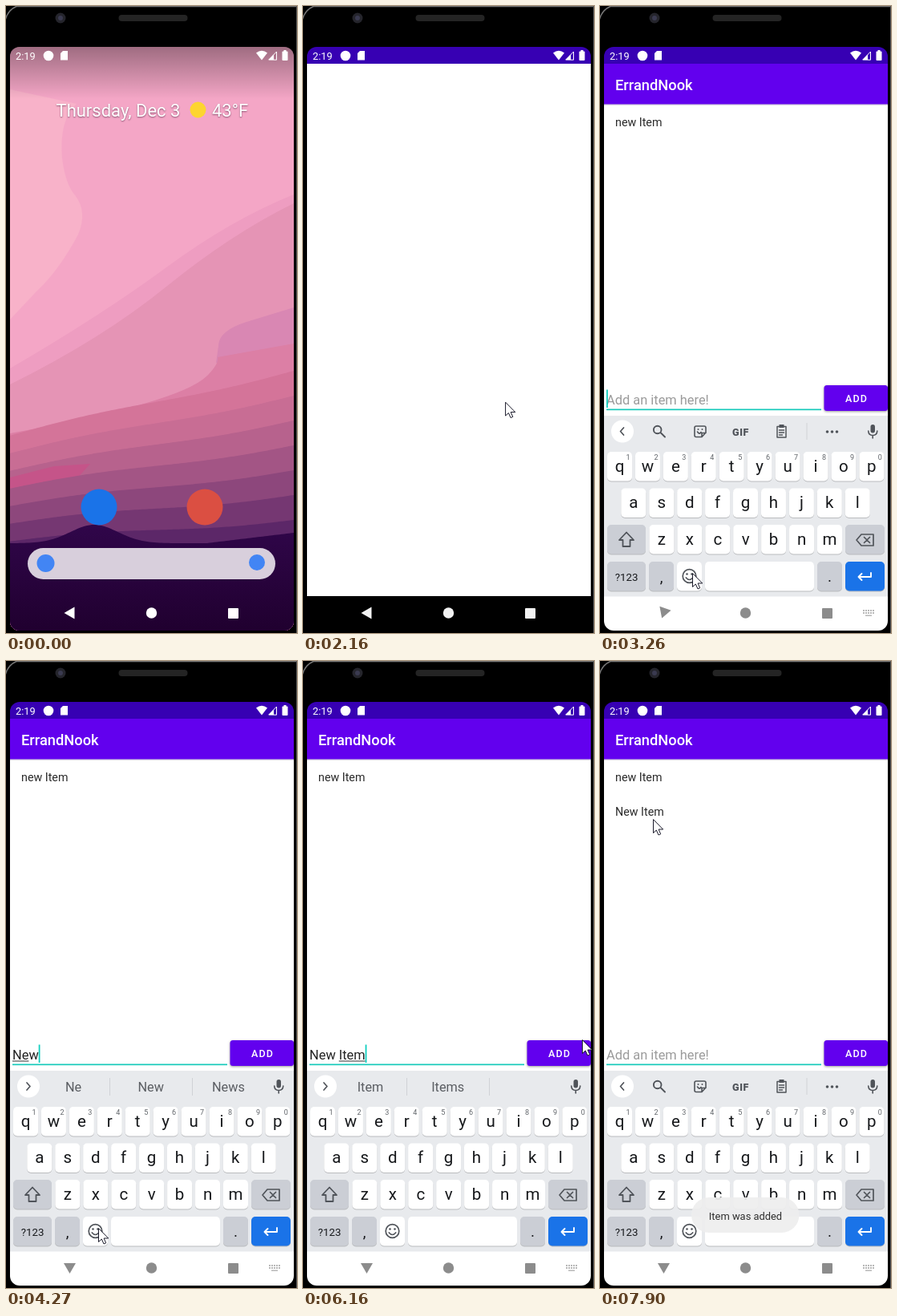
An HTML page with a canvas that plays this animation: 363x782 px, repeating every 8000 ms.

```html
<!DOCTYPE html>
<html lang="en">
<head>
<meta charset="utf-8">
<title>List app demo</title>
<style>
html, body { margin: 0; width: 100%; height: 100%; overflow: hidden; background: #000; }
canvas { display: block; width: 363px; height: 782px; }
</style>
</head>
<body>
<canvas id="stage"></canvas>
<script>
const W = 363, H = 782, LOOP = 8000;
const canvas = document.getElementById('stage');
const dpr = window.devicePixelRatio || 1;
canvas.width = W * dpr;
canvas.height = H * dpr;
const c = canvas.getContext('2d');

// Key moments, in ms
const LAUNCH = 1500, FULL = 1650, READY = 2310, FOCUS = 3020, KEYS = 3140;
const TYPE = 4000, WORD2 = 4700, TYPED = 5150, PRESS = 6820, ADDED = 7090, CLOSED = 7360;

const ramp = (t, a, b) => Math.min(1, Math.max(0, (t - a) / (b - a)));
const easeOut = u => 1 - (1 - u) ** 2;
const mix = (a, b, u) => a + (b - a) * u;

function rect(x, y, w, h, color) {
  c.fillStyle = color;
  c.fillRect(x, y, w, h);
}
function box(x, y, w, h, r, color) {
  c.fillStyle = color;
  c.beginPath();
  c.roundRect(x, y, w, h, r);
  c.fill();
}
function disc(x, y, r, color) {
  c.fillStyle = color;
  c.beginPath();
  c.arc(x, y, r, 0, 7);
  c.fill();
}
function shape(d, color) {
  c.fillStyle = color;
  c.fill(new Path2D(d));
}
function path(d, color, width) {
  c.strokeStyle = color;
  c.lineWidth = width;
  c.lineCap = c.lineJoin = 'round';
  c.stroke(new Path2D(d));
}
function text(s, x, y, size, color, align = 'left', weight = 400) {
  c.font = `${weight} ${size}px Roboto, sans-serif`;
  c.textAlign = align;
  c.fillStyle = color;
  c.fillText(s, x, y);
}
function fade(y, h, from, to) {
  const g = c.createLinearGradient(0, y, 0, y + h);
  g.addColorStop(0, from);
  g.addColorStop(1, to);
  return g;
}

function phone() {
  rect(0, 0, W, H, '#000');
  path('M-1 18Q2 5 13 .5H363', '#777', 1.5);
  rect(362, 0, 1, H, '#555');
  disc(68, 15, 6.5, '#25252c');
  disc(68, 15, 3, '#3a3a50');
  box(140.5, 11, 86, 8, 4, '#242424');
}

// Fills everything below the line y(x)
function land(color, y) {
  c.fillStyle = color;
  c.beginPath();
  for (let x = 5; x <= 359; x += 3) c.lineTo(x, y(x));
  c.lineTo(359, H);
  c.lineTo(5, H);
  c.fill();
}

function wallpaper() {
  rect(5, 51, 354, 728, '#f4a6c6');
  shape('M5 104L88 122Q66 142 70 190Q74 222 86 236Q102 256 90 285Q66 330 38 356L5 391Z', '#f8b2c9');
  shape('M5 452Q120 385 200 326T359 235V782H5Z', '#ee9dc1');
  shape('M5 472Q120 415 200 350T359 246V782H5Z', '#e594b5');
  shape('M359 376L300 394Q265 405 265 424L262 445L359 428Z', '#d987b3');
  shape('M5 533Q215 495 250 462Q266 446 264 438L359 421V782H5Z', '#dc7fa5');
  for (let i = 0; i < 7; i++) {
    const u = (i / 6) ** 1.3;
    const rgb = [mix(212, 92, u), mix(116, 39, u), mix(153, 104, u)];
    land(`rgb(${rgb})`, x => mix(536 + 22 * i, 454 + 31 * i, (x - 5) / 354) - 3 * Math.sin(x / 60));
    if (i === 2) shape('M5 588L60 574L105 571L88 590L5 607Z', '#c55489');
  }
  land(fade(647, 132, '#30064a', '#20002f'),
    x => 670 - 23 * Math.exp(-(((x - 110) / 42) ** 2)) - 13 * ramp(x, 250, 359));
  rect(5, 51, 354, 65, fade(51, 65, 'rgba(0,0,0,.35)', 'rgba(0,0,0,0)'));
}

function home() {
  c.save();
  c.shadowColor = 'rgba(60,20,50,.6)';
  c.shadowBlur = 2;
  c.shadowOffsetY = 1;
  text('Thursday, Dec 3', 62.5, 138, 22, '#fff');
  text('43°F', 257, 138, 22, '#fff');
  c.restore();
  disc(239.5, 129.5, 10, '#fdd530');
  disc(116, 625, 22.5, '#1a73e8');
  disc(248, 625, 22.5, '#db4f42');
  box(27, 676, 309, 39, 19.5, '#d8cfdc');
  disc(49.5, 695, 11, '#4285f4');
  disc(313, 694, 10, '#4285f4');
}

function statusIcons() {
  text('2:19', 12, 66.5, 12.8, '#fff');
  disc(53, 62, 6.3, '#fff');
  shape('M71 56H77V67.5H68V59Z', '#fff');
  shape('M312 58.5Q319 53 326 58.5L319 67.5Z', '#fff');
  path('M328 66.8L337.5 57V66.8Z', '#fff', 1);
  shape('M327.5 67L334 60.5V67Z', '#fff');
  box(344.5, 56.5, 7, 11.5, 1, '#fff');
  rect(346.5, 55, 3, 2, '#fff');
}

function navIcons(color, turn) {
  c.save();
  c.translate(79.5, 757);
  c.rotate(-turn);
  shape('M-7 0L6 -7.5V7.5Z', color);
  c.restore();
  disc(181.5, 757, 6.7, color);
  box(277, 751, 13, 13, 1, color);
}

function imeIcon(color) {
  for (let i = 0; i < 10; i++) rect(328 + i % 5 * 3, i < 5 ? 753 : 756, 2, 2, color);
  rect(331, 759.5, 8, 1.5, color);
}

function launchWindow() {
  rect(10, 61, 344, 21, '#3700b3');
  rect(10, 82, 344, 644, '#fff');
  rect(10, 726, 344, 42, '#000');
}

// One letter at a time, with a pause between the words
function typedText(t) {
  if (t < TYPE || t >= ADDED) return '';
  const n = t < WORD2
    ? Math.min(4, 1 + Math.floor((t - TYPE) / 133))
    : 5 + Math.floor((t - WORD2) / 80);
  return 'New Item'.slice(0, n);
}

// The keyboard reacts a little later than the field
const stem = t => typedText(t - 100).split(' ').pop();

function guesses(t) {
  if (!typedText(t)) return [];
  const word = stem(t);
  const known = ['New', 'News', 'Item', 'Items'].filter(w => w.startsWith(word));
  return [...new Set([word, ...known])].filter(Boolean).slice(0, 3);
}

function caretOn(t) {
  if (t >= TYPE && t < TYPED) return true;
  const reset = [READY, FOCUS - 90, TYPED, ADDED].findLast(r => r <= t);
  return (t - reset) % 1000 < 500;
}

function addButton(t, dy) {
  const press = Math.min(ramp(t, PRESS - 60, PRESS + 130), 1 - ramp(t, ADDED, CLOSED));
  c.save();
  c.shadowColor = 'rgba(0,0,0,.4)';
  c.shadowBlur = 3 + 3 * press;
  c.shadowOffsetY = 1 + press;
  box(279.5, 473 + dy, 79.5, 32, 3.5, '#6200ee');
  c.restore();
  box(279.5, 473 + dy, 79.5, 32, 3.5, `rgba(255,255,255,${.24 * press})`);
  c.letterSpacing = '1.1px';
  text('ADD', 306, 494 + dy, 12.5, '#fff', 'left', 500);
  c.letterSpacing = '0px';
}

function inputRow(t, dy) {
  const typed = typedText(t);
  text(typed || 'Add an item here!', 8, 496.5 + dy, 16.4, typed ? '#222' : '#9b9b9b');
  const width = s => c.measureText(s).width;
  if (typed) {
    const start = typed.slice(0, typed.lastIndexOf(' ') + 1);
    rect(8 + width(start), 498.5 + dy, width(stem(t)), 1, '#333');
  }
  rect(8, 502.5 + dy, 268, 1.7, '#16cabb');
  if (caretOn(t)) rect(8 + width(typed), 478.5 + dy, 1.8, 22.5, '#12cfc0');
  addButton(t, dy);
}

function appScreen(t, dy) {
  rect(5, 72, 354, 50.5, '#6200ee');
  rect(5, 122.5, 354, 2, fade(122.5, 2, 'rgba(60,20,120,.35)', 'rgba(60,20,120,0)'));
  text('ErrandNook', 19, 105, 18.3, '#fff', 'left', 500);
  text('new Item', 19, 150, 14.3, '#2a2a2a');
  if (t >= ADDED) text('New Item', 19, 193, 14.3, '#2a2a2a');
  inputRow(t, dy);
}

const INK = '#50545a', GREY = '#cbced5', PITCH = 34.93, KEY_W = 31, KEY_H = 36.5;

function key(x, y, w, color, label, size = 20.5, drop = 24.5) {
  box(x, y + 1, w, KEY_H, 5, 'rgba(0,0,0,.2)');
  box(x, y, w, KEY_H, 5, color);
  if (label) text(label, x + w / 2, y + drop, size, '#16181b', 'center');
}
function letters(s, x, y) {
  [...s].forEach((ch, i) => key(x + i * PITCH, y, KEY_W, '#fff', ch));
}

function mic() {
  box(337.5, 522, 5.5, 10.5, 2.7, INK);
  path('M334.7 530Q335 535.5 340.2 535.5Q345.5 535.5 345.8 530M340.2 536V539', INK, 1.6);
}

function toolbar() {
  path('M29.5 526L25.5 530.5L29.5 535', INK, 1.7);
  path('M76.5 528.5A4.8 4.8 0 1 1 66.9 528.5A4.8 4.8 0 1 1 76.5 528.5M75.5 532L81 537.5', INK, 1.9);
  path('M120 524H130Q132 524 132 526V532L127 537.5H120Q118 537.5 118 535.5V526Q118 524 120 524M127 537V532.5H132M121.5 531Q124 535 126 531.5', INK, 1.6);
  disc(122.5, 528, 1, INK);
  disc(127.5, 528, 1, INK);
  c.letterSpacing = '.6px';
  text('GIF', 175.5, 535.5, 12.5, INK, 'center', 900);
  c.letterSpacing = '0px';
  path('M221 524.5H232V538H221ZM223.5 529H229.5M223.5 532H229.5M223.5 535H227.5', INK, 1.5);
  rect(223.5, 522, 6, 4, INK);
  rect(257.5, 520, 1, 21, '#d0d2d6');
  for (let i = 0; i < 3; i++) disc(283.5 + 6 * i, 531, 1.8, INK);
}

function suggestions(words) {
  path('M26 526L30 530.5L26 535', INK, 1.7);
  words.forEach((w, i) => text(w, 84 + i * 96.7, 537, 16.3, '#5a5d62', 'center'));
  rect(129, 520, 1, 22, '#d0d2d6');
  rect(232, 520, 1, 22, '#d0d2d6');
}

function keyboard(t) {
  rect(5, 511, 354, 226, '#e8eaed');
  disc(28, 530.5, 14, '#fff');
  if (t >= TYPE + 270 && t < CLOSED) suggestions(guesses(t));
  else toolbar();
  mic();

  letters('qwertyuiop', 9, 556);
  for (let i = 0; i < 10; i++) text((i + 1) % 10, 35 + i * PITCH, 566, 9, '#5f6368', 'center');
  letters('asdfghjkl', 26.3, 601.5);
  letters('zxcvbnm', 61.4, 647);
  key(9, 647, 48, GREY);
  path('M33 656.5L42 666H37.5V674H28.5V666H24Z', INK, 1.8);
  key(306, 647, 49, GREY);
  path('M326 659H341V673H326L320 666ZM329.5 662.5L336.5 669.5M336.5 662.5L329.5 669.5', INK, 1.7);

  key(9, 693, 48, GREY, '?123', 13.3, 23.5);
  key(61, 693, KEY_W, GREY, ',', 19, 26);
  key(96, 693, KEY_W, '#fff');
  path('M103.2 711A8.3 8.3 0 1 1 119.8 711A8.3 8.3 0 1 1 103.2 711M107.3 713Q111.5 718 115.7 713', INK, 1.7);
  disc(108.5, 708.5, 1.3, INK);
  disc(114.5, 708.5, 1.3, INK);
  key(131, 693, 136, '#fff');
  key(271, 693, KEY_W, GREY, '.', 19, 25);
  key(306, 693, 49, '#1a73e8');
  path('M338 707V712H322.5M326.5 708L322.5 712L326.5 716', '#fff', 1.9);
}

function toast(alpha) {
  c.save();
  c.globalAlpha = alpha;
  box(114, 669, 134.5, 44, 22, 'rgba(238,238,238,.92)');
  text('Item was added', 181.5, 697, 12.9, '#2f2f2f', 'center');
  c.restore();
}

function pointer(t) {
  if (t < 2040) return;
  const pace = 136.4;
  const now = LAUNCH + Math.floor((t + 60 - LAUNCH) / pace) * pace;
  let x = 334, y = 367;
  const glide = (start, end, toX, toY) => {
    const u = easeOut(ramp(now, start, end));
    x = mix(x, toX, u);
    y = mix(y, toY, u);
  };
  glide(2040, 2720, 115, 708);
  glide(5820, 6130, 348, 473);
  glide(6170, 6400, 320, 474);
  glide(7220, 7860, 66, 198);

  const arrow = 'M0 0V16.5L3.8 13L6.5 19L9.2 17.8L6.6 12H11.8Z';
  c.save();
  c.translate(x + .5, y);
  shape(arrow, '#fff');
  path(arrow, '#1a1a2a', 1);
  c.restore();
}

function draw(t) {
  phone();
  c.save();
  c.beginPath();
  c.roundRect(5, 51, 354, 728, 12);
  c.clip();

  const keys = t >= KEYS;
  if (t < FULL) {
    wallpaper();
    if (t < LAUNCH) home();
    else launchWindow();
  } else {
    rect(5, 51, 354, 728, '#000');
    rect(5, 51, 354, 21, '#3700b3');
    rect(5, 72, 354, 664, '#fff');
    if (t >= READY) appScreen(t, keys ? 0 : 225);
  }
  if (keys) {
    c.save();
    c.translate(0, 60 * (1 - easeOut(ramp(t, KEYS - 40, KEYS + 110))));
    keyboard(t);
    c.restore();
    rect(5, 736.5, 354, 43, '#fff');
  }
  statusIcons();

  const level = keys ? 140 : mix(255, 153, ramp(t, 2040, FOCUS));
  const turn = easeOut(ramp(t, KEYS - 40, KEYS + 260)) * Math.PI / 2;
  navIcons(`rgb(${level},${level},${level})`, turn);
  if (t >= FOCUS) imeIcon(keys ? '#b8b8b8' : '#8a8a8a');
  toast(ramp(t, ADDED - 50, 7850));
  c.restore();
  pointer(t);
}

const begin = performance.now();
function tick() {
  c.setTransform(dpr, 0, 0, dpr, 0, 0);
  draw((performance.now() - begin) % LOOP);
  requestAnimationFrame(tick);
}
tick();
</script>
</body>
</html>
```
